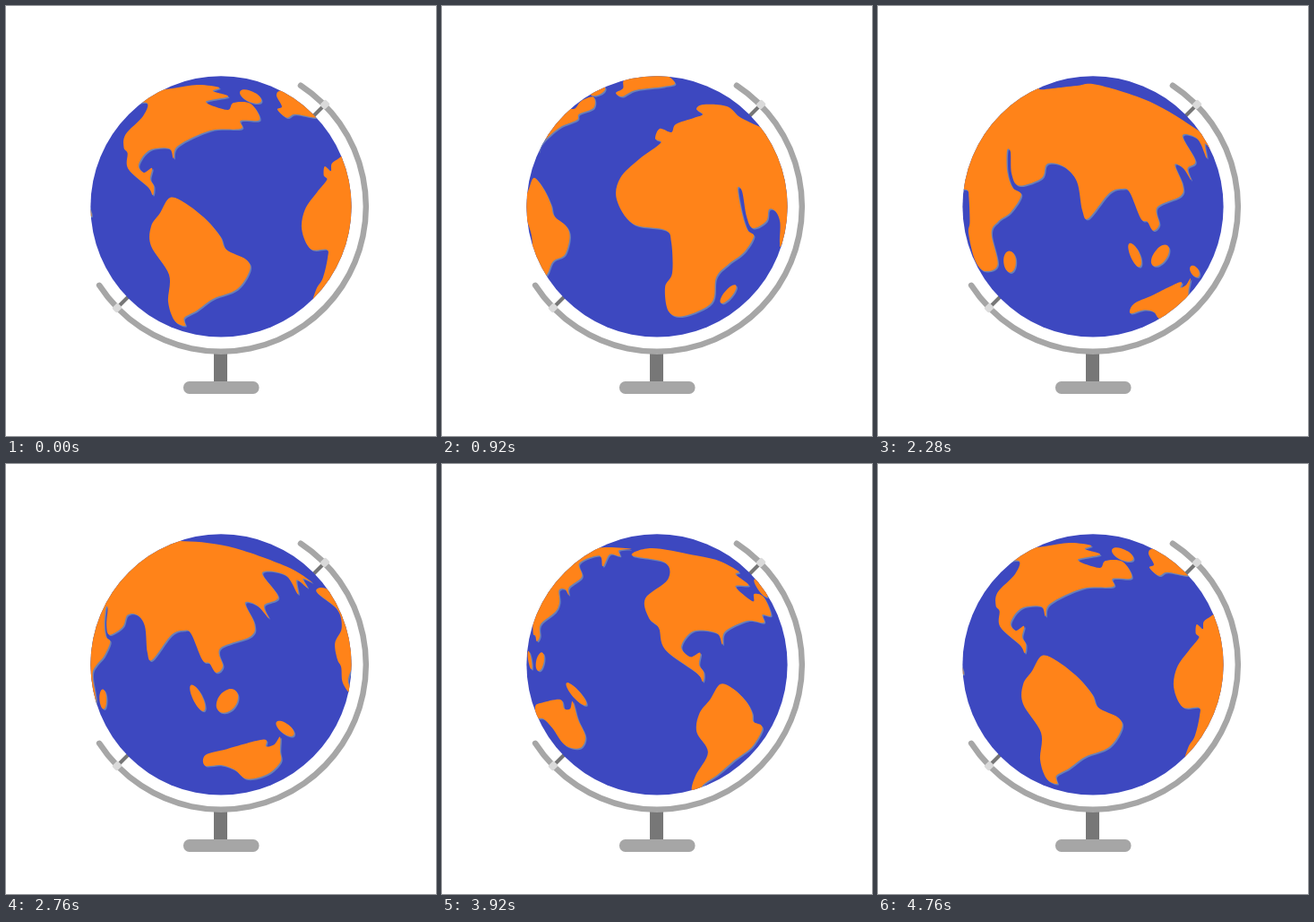
Recreate the animation shown at these times as an HTML page with a canvas. Size 480 by 480 pixels, loop 4.8 s.

```html
<!DOCTYPE html>
<html lang="en">
<head>
<meta charset="utf-8">
<title>Desk globe</title>
<style>
  html, body { margin: 0; width: 100%; height: 100%; overflow: hidden; background: #fff; }
  canvas { display: block; width: 480px; height: 480px; }
</style>
</head>
<body>
<canvas id="stage" width="480" height="480"></canvas>
<script>
const ctx = document.getElementById('stage').getContext('2d');
const LOOP = 4800, STEP = 40, TURN = 4760;
const CX = 240, CY = 223.9, R = 145.6;
const UNIT = 908;                 // ms the flat map needs to slide by one radius
const WIDTH = TURN / UNIT;        // width of the flat map, in radii
const TILT = 14 * Math.PI / 180, SIN = Math.sin(TILT), COS = Math.cos(TILT);
const SEA = '#3d48c0', LAND = '#ff8319', SHORE = '#6a80b6';
const STEEL = '#a6a6a6', DARK = '#777', KNOB = '#dadada';

// The map is flat, slides along a tilted line and bulges at the centre:
// flat radius = r + r^5 / 2 for a screen radius r.
function toMap(x, y, t) {
  const a = (x - CX) / R, b = (CY - y) / R;
  const k = 1 + (a * a + b * b) ** 2 / 2;
  return [(a * COS - b * SIN) * k + t / UNIT, (a * SIN + b * COS) * k];
}

function toScreen(p, q) {
  const flat = Math.hypot(p, q);
  let r = Math.min(flat, 1.4);
  for (let i = 0; i < 7; i++) r -= (r + r ** 5 / 2 - flat) / (1 + 2.5 * r ** 4);
  const k = flat ? r / flat : 1, u = p * k, v = q * k;
  return [CX + R * (u * COS + v * SIN), CY - R * (v * COS - u * SIN)];
}

// Key points of a coast as they stand on the stage at time t
function coast(t, ...xy) {
  const pts = [];
  for (let i = 0; i < xy.length; i += 2) pts.push(toMap(xy[i], xy[i + 1], t));
  return pts;
}

// Oval island: centre, half axes and slope in degrees at time t
function island(t, x, y, a, b, deg) {
  const s = Math.sin(deg * Math.PI / 180), c = Math.cos(deg * Math.PI / 180);
  return Array.from({ length: 10 }, (_, i) => {
    const w = i * Math.PI / 5, m = a * Math.cos(w), n = b * Math.sin(w);
    return toMap(x + m * c - n * s, y + m * s + n * c, t);
  });
}

const southAmerica = coast(0,
  183,214, 200,220, 223,238, 239,257, 246,272, 268,283, 272,295, 258,316, 231,327, 213,340,
  199,348, 200,357, 188,351, 181,330, 182,300, 162,268, 162,246, 172,231);

const northAmerica = [
  ...coast(TURN,
    186,92, 214,88, 238,91, 231,95, 248,101, 223,107, 247,116, 254,108, 273,109, 283,127,
    262,128, 262,137, 228,139, 192,156, 187,170, 182,159, 160,161, 148,177, 154,186, 163,181,
    161,193, 165,201),
  ...coast(3920,
    291,243, 284,233, 249,207, 242,183, 231,172, 227,150, 252,129, 249,110, 212,102, 234,94)
];

const greenland = coast(920,
  194,97, 201,101, 216,94, 247,90, 260,86, 245,75, 215,76, 203,83, 202,92);

const oldWorld = [
  ...coast(920,
    238,148, 244,153, 220,171, 199,192, 195,216, 213,243, 249,250, 256,264, 257,298, 249,314,
    253,341, 270,346, 301,331, 306,303, 320,288, 337,275, 348,257, 341,250, 335,232, 330,204,
    335,207, 340,235, 347,248, 362,240, 365,227),
  ...coast(2280, 207,179, 222,196, 228,228, 235,237, 258,209, 273,204),
  ...coast(3200,
    149,178, 156,203, 162,206, 168,216, 175,209, 173,190, 205,176, 210,162, 202,142, 215,143,
    227,155, 223,142, 242,131, 228,109, 258,107, 271,125, 273,110, 288,117, 283,108, 297,111,
    262,98, 200,89),
  ...coast(2280, 245,88, 222,89, 195,92),
  ...coast(920, 331,123, 318,112, 292,110, 284,115, 291,121, 281,125, 261,132, 256,141, 243,137)
];

const australia = coast(3200,
  165,306, 184,302, 224,296, 229,306, 240,305, 246,296, 250,315, 255,331, 241,344, 216,345,
  198,330, 182,321, 167,319);

const lands = [
  southAmerica, northAmerica, greenland, oldWorld, australia,
  island(0, 273, 101, 13, 6, 25),
  island(920, 319.5, 321.5, 13, 4.5, -50),
  island(3200, 152, 243, 15, 4, 68),
  island(3200, 180, 247, 14, 10, -60),
  island(3200, 252, 286, 18, 6, 38)
];

// Smooth closed curve through all points
function addCurve(path, pts) {
  const n = pts.length, at = i => pts[(i + n) % n], k = 1 / 6;
  path.moveTo(...pts[0]);
  for (let i = 0; i < n; i++) {
    const [a, b, c, d] = [at(i - 1), at(i), at(i + 1), at(i + 2)];
    path.bezierCurveTo(
      b[0] + (c[0] - a[0]) * k, b[1] + (c[1] - a[1]) * k,
      c[0] - (d[0] - b[0]) * k, c[1] - (d[1] - b[1]) * k, c[0], c[1]);
  }
  path.closePath();
}

function landPath(t) {
  const path = new Path2D();
  for (const land of lands) {
    for (const copy of [-1, 0, 1]) {
      const shift = copy * WIDTH - t / UNIT;
      if (land.some(([p]) => Math.abs(p + shift) < 1.6))
        addCurve(path, land.map(([p, q]) => toScreen(p + shift, q)));
    }
  }
  return path;
}

function line(x1, y1, x2, y2, width, color) {
  ctx.beginPath();
  ctx.moveTo(x1, y1);
  ctx.lineTo(x2, y2);
  ctx.lineWidth = width;
  ctx.strokeStyle = color;
  ctx.stroke();
}

function drawStand() {
  ctx.lineCap = 'butt';
  line(239.5, 384, 239.5, 421, 15, DARK);
  line(340, 126, 356, 110, 4, DARK);
  line(140, 321, 124, 337, 4, DARK);
  ctx.fillStyle = STEEL;
  ctx.beginPath();
  ctx.roundRect(198, 419, 84.5, 14, 6.5);
  ctx.fill();

  ctx.lineCap = 'round';
  ctx.lineWidth = 6.5;
  ctx.strokeStyle = STEEL;
  ctx.beginPath();
  ctx.arc(CX, CY, 161.8, Math.atan2(-136, 89.5), Math.atan2(88, -136));
  ctx.stroke();

  for (const [x, y] of [[356, 110], [124, 337]]) {
    ctx.save();
    ctx.translate(x, y);
    ctx.rotate(Math.PI / 4);
    ctx.fillStyle = KNOB;
    ctx.beginPath();
    ctx.roundRect(-4, -4.5, 8, 9, 2);
    ctx.fill();
    ctx.restore();
  }
}

function drawGlobe(t) {
  const land = landPath(t);
  ctx.save();
  ctx.beginPath();
  ctx.arc(CX, CY, R, 0, 2 * Math.PI);
  ctx.fillStyle = SEA;
  ctx.fill();
  ctx.clip();
  ctx.translate(1.4, 1.4);
  ctx.fillStyle = SHORE;
  ctx.fill(land);
  ctx.translate(-1.4, -1.4);
  ctx.fillStyle = LAND;
  ctx.fill(land);
  ctx.restore();
}

function draw(now) {
  const t = Math.floor((now % LOOP) / STEP) * STEP;
  ctx.fillStyle = '#fff';
  ctx.fillRect(0, 0, 480, 480);
  drawStand();
  drawGlobe(t);
}

const start = performance.now();
function tick() {
  draw(performance.now() - start);
  requestAnimationFrame(tick);
}
tick();
</script>
</body>
</html>
```
